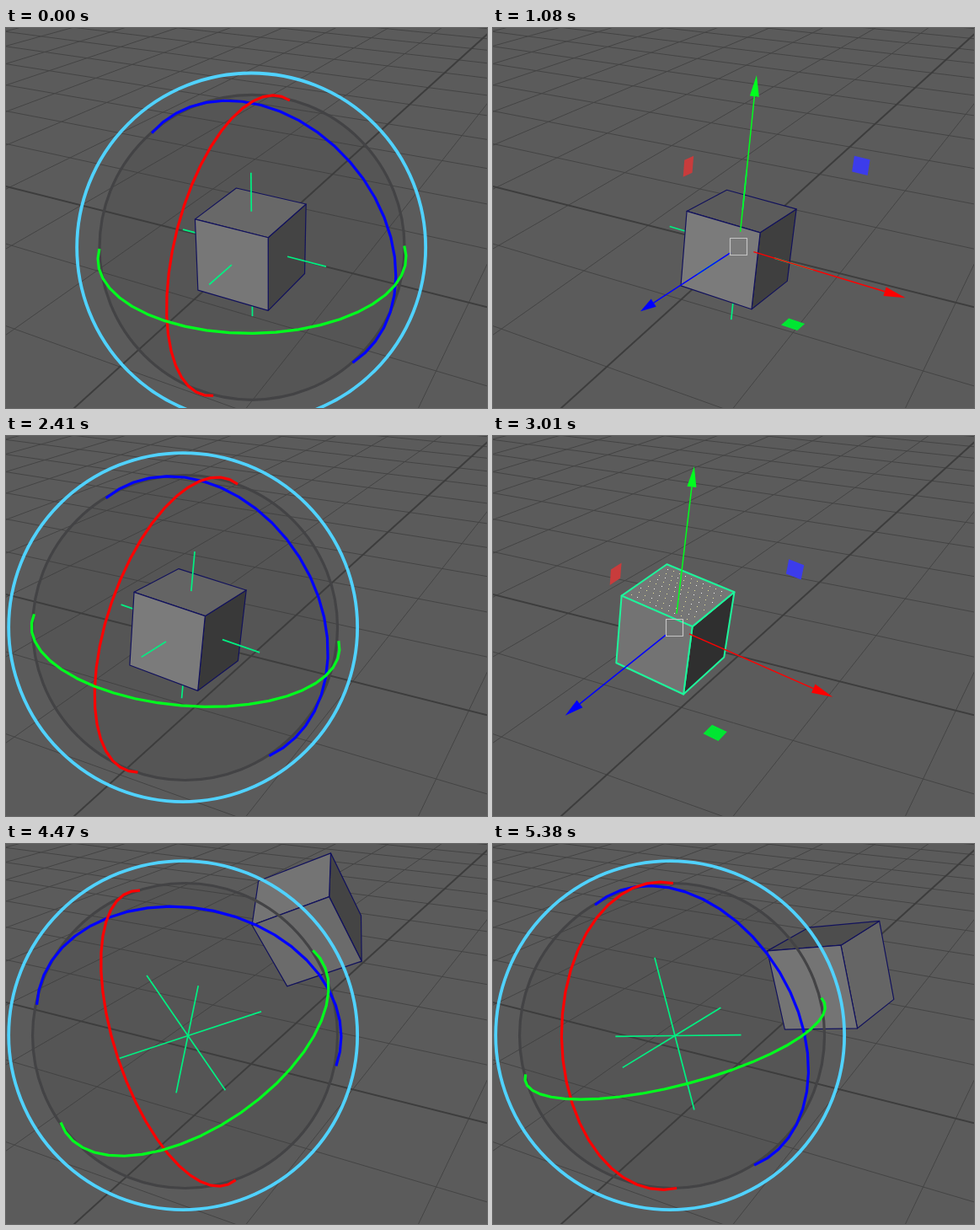
Recreate the animation shown at these times as an HTML page with a canvas. Size 571 px wide and 451 px high, loop 5.6 s.

```html
<!DOCTYPE html>
<html lang="en">
<head>
<meta charset="utf-8">
<title>Cube manipulators</title>
<style>
html, body { margin: 0; width: 571px; height: 451px; overflow: hidden; background: #5b5b5b; }
canvas { display: block; width: 571px; height: 451px; }
</style>
</head>
<body>
<canvas id="stage" width="571" height="451"></canvas>
<script>
const g = document.getElementById('stage').getContext('2d');
const LOOP = 5600, D = 1097, MX = 285, MY = 225;
const HALF = 47.5, AXIS = 97, RADIUS = 181, SHAFT = 184, TIP = 208;
const CELL = 128, GROUND_D = 850;
const RED = '#ff0000', GREEN = '#00ff1e', BLUE = '#0000ff', MINT = '#00f082';
const COLORS = [RED, GREEN, BLUE];

// Vectors: x right, y down, z towards the viewer
const add = (a, b) => a.map((v, i) => v + b[i]);
const mul = (a, k) => a.map(v => v * k);
const dot = (a, b) => a[0] * b[0] + a[1] * b[1] + a[2] * b[2];
const cross = (a, b) => [a[1] * b[2] - a[2] * b[1], a[2] * b[0] - a[0] * b[2], a[0] * b[1] - a[1] * b[0]];
const unit = a => mul(a, 1 / Math.hypot(...a));
const lerp = (a, b, k) => a.map((v, i) => v + (b[i] - v) * k);
const at = (o, axes, x, y, z) => add(o, add(mul(axes[0], x), add(mul(axes[1], y), mul(axes[2], z))));

// Right-angled axes, sharing any error between x and y
function frame(x, y) {
  const e = dot(x, y) / 2;
  const X = unit(add(x, mul(y, -e))), Y = unit(add(y, mul(x, -e)));
  return [X, Y, unit(cross(Y, X))];
}

function project(p) {
  const s = D / (D - p[2]);
  return [MX + p[0] * s, MY + p[1] * s];
}

const WORLD = frame([.8846, .222, .41], [0, -.879, .477]);
const START = frame([.872, .209, .443], [-.008, -.891, .454]);
const TURNED = frame([.934, .271, .245], [.159, -.897, .410]);
const LEVEL = frame([.875, .242, .42], [.102, -.923, .37]);
const TILTED = frame([.865, .357, .354], [.145, -.821, .553]);
const RAISED = frame([.864, -.359, .354], [-.478, -.683, .553]);
const SWUNG = frame([.76, -.036, .652], [-.234, -.937, .262]);
const SWAY = frame([.71, .05, .70], [-.21, -.945, .25]);
const FINAL = frame([.802, -.025, .60], [-.211, -.931, .295]);

const HOME = [291.7, 260.3], PIVOT = [216, 227.5], ASIDE = [414, 219];
const DRAG = [HOME, [225, 215], [174, 183], [185, 190], [206.5, 211], PIVOT];
const place = p => [p[0] - MX, p[1] - MY, 0];
const ARM = TILTED.map(a => dot(a, [ASIDE[0] - PIVOT[0], ASIDE[1] - PIVOT[1], 0]));

// Progress in n hard steps, the first at time a and the last at time b
function steps(t, a, b, n) {
  if (t < a) return 0;
  return Math.min(1, (Math.floor((t - a) / (b - a) * (n - 1) + .01) + 1) / n);
}

function along(list, k, mix) {
  const u = k * (list.length - 1), i = Math.min(list.length - 2, Math.floor(u));
  return mix(list[i], list[i + 1], u - i);
}

const turn = (a, b, k) => frame(lerp(a[0], b[0], k), lerp(a[1], b[1], k));

function pose(t) {
  if (t < 660) return turn(START, TURNED, steps(t, 70, 600, 10));
  if (t < 2290) return turn(TURNED, LEVEL, steps(t, 660, 1020, 7));
  if (t < 4220) return turn(LEVEL, TILTED, steps(t, 2290, 2770, 9));
  if (t < 4870) return along([TILTED, RAISED, SWUNG], steps(t, 4220, 4810, 11), turn);
  return along([SWUNG, SWAY, FINAL], steps(t, 4870, 5380, 9), turn);
}

function path(pts, color, width, fill) {
  g.beginPath();
  pts.forEach(p => g.lineTo(p[0], p[1]));
  if (fill) {
    g.closePath();
    g.fillStyle = fill;
    g.fill();
  }
  if (color) {
    g.strokeStyle = color;
    g.lineWidth = width;
    g.stroke();
  }
}

const line = (a, b, color, width) => path([project(a), project(b)], color, width);

function circle(x, y, r, color, width, fill) {
  g.beginPath();
  g.arc(x, y, r, 0, Math.PI * 2);
  if (fill) {
    g.fillStyle = fill;
    g.fill();
  } else {
    g.strokeStyle = color;
    g.lineWidth = width;
    g.stroke();
  }
}

// The floor is seen around the world centre with its own depth
function ground(p) {
  const s = GROUND_D / (GROUND_D - p[2]);
  return [291 + p[0] * s, 261 + p[1] * s];
}

function gridLine(side, dir, n) {
  const p = mul(side, n * CELL);
  const near = (GROUND_D * .78 - p[2]) / dir[2];
  const ends = [add(p, mul(dir, -4000)), add(p, mul(dir, near))];
  path(ends.map(ground), n ? '#444444' : '#3d3d3d', n ? 1 : 2);
}

function grid() {
  const [X, , Z] = WORLD;
  for (let n = -22; n <= 9; n++) {
    if (!n) continue;
    gridLine(Z, X, n);
    gridLine(X, Z, n);
  }
  gridLine(Z, X, 0);
  gridLine(X, Z, 0);
}

function topDots(c, axes) {
  for (let j = 0; j < 9; j++) {
    for (let i = 0; i < 10; i++) {
      const x = -41 + i * 8.4 + (j % 2) * 4;
      const p = project(at(c, axes, x, HALF, -39 + j * 9.6));
      g.fillStyle = (i + j) % 3 ? '#e6e29a' : '#f4f4f4';
      g.fillRect(Math.round(p[0]), Math.round(p[1]), 1, 1);
    }
  }
}

function cube(c, axes, edge, width, dotted) {
  for (let i = 0; i < 3; i++) {
    for (const s of [-1, 1]) {
      const n = mul(axes[i], s), mid = add(c, mul(n, HALF));
      if (dot(n, add([0, 0, D], mul(mid, -1))) <= 0) continue;
      const u = mul(axes[(i + 1) % 3], HALF), v = mul(axes[(i + 2) % 3], HALF);
      const pts = [[-1, -1], [1, -1], [1, 1], [-1, 1], [-1, -1]]
        .map(([a, b]) => project(add(mid, add(mul(u, a), mul(v, b)))));
      const shade = Math.round(Math.max(28, Math.min(123, 169 * n[2] - 31 * n[1])));
      path(pts, edge, width, `rgb(${shade},${shade},${shade})`);
    }
  }
  if (dotted) topDots(c, axes);
}

function halfRing(o, axis, color) {
  const view = unit([-o[0], -o[1], D]);
  const front = unit(add(view, mul(axis, -dot(view, axis))));
  const side = cross(axis, front), pts = [];
  for (let i = 0; i <= 24; i++) {
    const a = (i / 24 - .5) * Math.PI;
    pts.push(project(add(o, add(mul(front, RADIUS * Math.cos(a)), mul(side, RADIUS * Math.sin(a))))));
  }
  path(pts, color, 3.2);
}

const ball = o => [MX + o[0] * 1.05, MY + o[1]];

function rotator(o, axes, ring) {
  circle(...ball(o), RADIUS, '#434345', 3.2);
  halfRing(o, axes[2], BLUE);
  halfRing(o, axes[0], RED);
  halfRing(o, axes[1], GREEN);
  circle(MX - 1 + o[0] * 1.07, MY - .5 + o[1] * 1.02, 207, ring, 3.8);
}

function arrow(o, axis, color) {
  const a = project(add(o, mul(axis, SHAFT))), b = project(add(o, mul(axis, TIP)));
  const len = Math.hypot(b[0] - a[0], b[1] - a[1]);
  const nx = (a[1] - b[1]) / len * 5.5, ny = (b[0] - a[0]) / len * 5.5;
  path([b, [a[0] + nx, a[1] + ny], [a[0] - nx, a[1] - ny]], null, 0, color);
}

function planeHandle(o, u, v, color) {
  const c = add(o, mul(add(u, v), 135));
  const pts = [[-9, -9], [9, -9], [9, 9], [-9, 9]]
    .map(([a, b]) => project(add(c, add(mul(u, a), mul(v, b)))));
  path(pts, null, 0, color);
}

function mover(o, axes, active) {
  axes.forEach((a, i) => {
    line(add(o, mul(a, 20)), add(o, mul(a, SHAFT)), COLORS[i], 1.5);
    if (!active) arrow(o, a, COLORS[i]);
  });
  if (!active) {
    planeHandle(o, axes[1], axes[2], '#c83c3c');
    planeHandle(o, axes[0], axes[2], '#00e632');
    planeHandle(o, axes[0], axes[1], '#3c3ceb');
  }
  const [x, y] = project(o);
  g.strokeStyle = active ? '#ffff64' : '#c4c4c4';
  g.lineWidth = 1.2;
  g.strokeRect(Math.round(x) - 10.5, Math.round(y) - 10.5, 20, 20);
}

function ghost(o, axes) {
  const knob = p => {
    g.fillStyle = '#999999';
    g.fillRect(Math.round(p[0]) - 3, Math.round(p[1]) - 3, 7, 7);
  };
  axes.forEach(a => {
    const end = add(o, mul(a, SHAFT));
    line(o, end, '#999999', 1.4);
    knob(project(end));
  });
  knob(project(o));
}

function draw(t) {
  const axes = pose(t);
  const moving = (t >= 1080 && t < 1930) || (t >= 2890 && t < 3920);
  const parts = t >= 3010 && t < 3920;
  const away = t >= 3920;
  const dragA = t >= 1320 && t < 1870, dragB = t >= 3250 && t < 3790;

  let spot = along(DRAG, steps(t, 1320, 1870, 10), lerp);
  if (parts) spot = lerp(PIVOT, ASIDE, steps(t, 3250, 3790, 8));
  const o = place(spot);
  const c = away ? at(o, axes, ...ARM) : o;

  g.fillStyle = '#5b5b5b';
  g.fillRect(0, 0, 571, 451);
  g.lineJoin = 'round';
  grid();

  if (!moving) circle(...ball(o), RADIUS, null, 0, 'rgba(60,60,60,.2)');
  if (!parts) axes.forEach(a => line(o, add(o, mul(a, -AXIS)), MINT, 1.7));
  cube(c, axes, parts ? '#1ef59b' : '#12125c', parts ? 2 : 1.2, t >= 3010 && t < 4220);
  if (!parts) {
    axes.forEach(a => line(add(o, mul(a, away ? 0 : HALF)), add(o, mul(a, AXIS)), MINT, 1.7));
  }

  if (moving) {
    if (dragA) ghost(place(HOME), axes);
    if (dragB) ghost(place(PIVOT), axes);
    mover(o, axes, dragA || dragB);
  } else {
    const waiting = (t >= 1930 && t < 2290) || (t >= 3920 && t < 4220);
    rotator(o, axes, waiting ? '#ffff78' : '#50d2ff');
  }
}

const begin = performance.now();
function tick() {
  draw((performance.now() - begin) % LOOP);
  requestAnimationFrame(tick);
}
tick();
</script>
</body>
</html>
```
